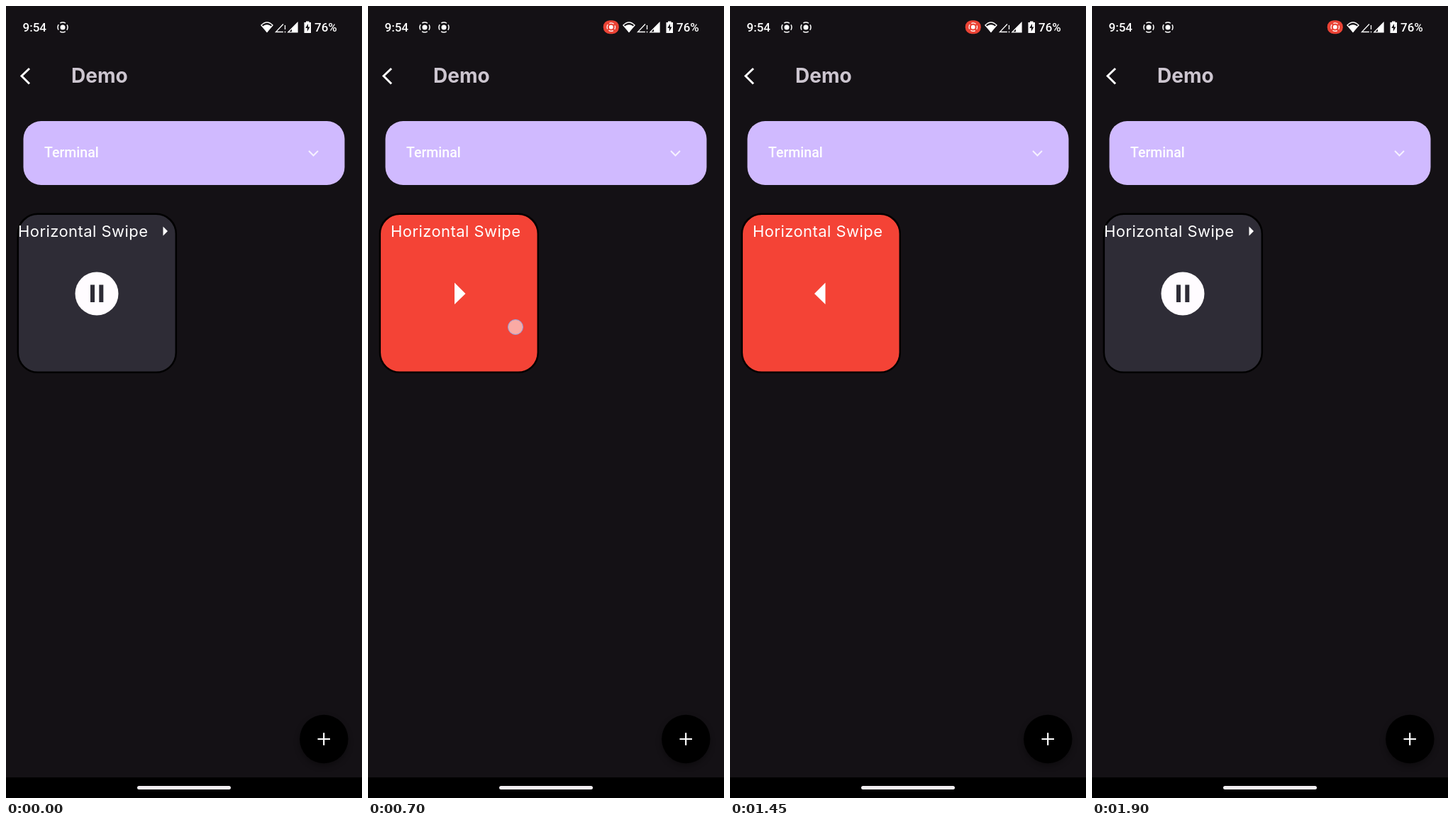
Recreate the animation shown at these times as an HTML page. Size 502 by 1115 pixels, loop 2.25 s.

```html
<!DOCTYPE html>
<html lang="en">
<head>
<meta charset="utf-8">
<title>Swipe demo</title>
<style>
  html, body { margin: 0; width: 100%; height: 100%; overflow: hidden; background: #141115; }
  svg { display: block; width: 502px; height: 1115px; }
  text { fill: #fff; }
  .roboto { font-family: Roboto, sans-serif; font-weight: 500; }
  .inter { font-family: Inter, sans-serif; }
  .line { fill: none; stroke: #fff; }
</style>
</head>
<body>
<svg viewBox="0 0 502 1115">
  <defs>
    <g id="record">
      <circle r="3.5" fill="#fff"/>
      <circle class="line" r="7" stroke-width="1.5" stroke-dasharray="8 3" stroke-dashoffset="4"/>
    </g>
    <filter id="soft" x="-30%" y="-30%" width="160%" height="160%"><feGaussianBlur stdDeviation="4"/></filter>
  </defs>
  <rect width="502" height="1115" fill="#141115"/>

  <!-- status bar -->
  <g class="roboto" font-size="17">
    <text x="23.5" y="36">9:54</text>
    <text x="435" y="36">76%</text>
  </g>
  <use id="newIcon" href="#record" x="80" y="30"/>
  <use id="oldIcon" href="#record" y="30"/>
  <g id="chip">
    <rect x="-11" y="-9.5" width="22" height="19" rx="9" fill="#ea4335"/>
    <use href="#record" transform="scale(.82)"/>
  </g>
  <g fill="#fff">
    <path class="line" d="M360 27Q368 19 376 27L368 36.500Z" stroke-width="1.4"/>
    <path d="M362 28.500Q368 24 374 28.500L368 37Z"/>
    <path class="line" d="M391 25.500L380.500 36.500H391M393.500 27V33M393.500 35.500V37.500" stroke-width="1.3"/>
    <path class="line" d="M398 36.800L411 23.500V36.800Z" stroke-width="1.3"/>
    <path d="M403 31.500L411 23.500V37H403Z"/>
    <path d="M423 21.500H427.500V23H430V38H420.500V23H423Z"/>
  </g>
  <path d="M426 25L422.300 31H424.800V36L428.500 29.500H426Z" fill="#141115"/>

  <!-- header -->
  <path class="line" d="M33 88L22 98.500L33 109.500" stroke-width="3"/>
  <text class="inter" x="92" y="108" font-size="28" font-weight="700" style="fill:#cdc6d0">Demo</text>

  <rect x="24.500" y="162" width="453" height="90" rx="25" fill="#d0baff"/>
  <text class="roboto" x="54" y="213" font-size="19.5">Terminal</text>
  <path class="line" d="M427 204L433.500 210.500L440 204" stroke-width="2" opacity=".8"/>

  <!-- card -->
  <rect id="card" x="16.800" y="292.800" width="223" height="223" rx="28" stroke="#000" stroke-width="2.500"/>
  <text id="title" class="inter" y="324.500" font-size="22" letter-spacing=".45">Horizontal Swipe</text>
  <g id="paused">
    <path d="M221.500 310.500L228 317L221.500 323.500Z" fill="#fff"/>
    <circle cx="128" cy="405" r="30.500" fill="#fffcff"/>
    <path d="M119 392.500h6v24.500h-6zM131.300 392.500h6v24.500h-6z" fill="#2e2c36"/>
  </g>
  <path id="arrow" fill="#fff"/>
  <circle id="touch" r="10.500" fill="#fff" fill-opacity=".55" stroke="#8fa4e0"/>

  <!-- bottom -->
  <circle cx="448" cy="1036" r="34" fill="#000" opacity=".35" filter="url(#soft)"/>
  <circle cx="448.300" cy="1032" r="34.200" fill="#000"/>
  <path class="line" d="M439.500 1032h17.500M448.200 1023.300v17.500" stroke-width="2.200"/>
  <rect y="1086" width="502" height="29" fill="#000"/>
  <rect x="185" y="1098" width="132" height="5" rx="2.500" fill="#f2eef2"/>
</svg>
<script>
  const LOOP = 2250, STEP = 50, SWIPE = 150;
  const swipes = [
    { at: 650, from: 150, to: 232.4, y: 452 },
    { at: 1150, from: 184, to: 90, y: 460 },
    { at: 1650, from: 165, to: 77, y: 452 }
  ];
  const RIGHT = "M122 389.500L137.500 405L122 420Z";
  const LEFT = "M134.500 389.500L119 405L134.500 420Z";

  const $ = id => document.getElementById(id);
  const set = (id, attrs) => {
    for (const key in attrs) $(id).setAttribute(key, attrs[key]);
  };
  const ramp = (t, a, b) => Math.min(1, Math.max(0, (t - a) / (b - a)));
  const easeOut = (u, power) => 1 - (1 - u) ** power;

  function draw(t) {
    // the second notification pushes the first one aside
    set("newIcon", { opacity: ramp(t, 300, 500) });
    set("oldIcon", { x: 80 + 27 * easeOut(ramp(t, 200, 500), 2) });
    const grow = ramp(t, 50, 300);
    set("chip", {
      opacity: t < 100 ? 0 : grow,
      transform: `translate(342.800 29.700) scale(${0.6 + 0.4 * grow})`
    });

    const active = t >= 700 && t < 1700;
    set("card", { fill: active ? "#f44336" : "#2e2c36" });
    set("title", { x: active ? 32 : 17 });
    set("paused", { visibility: active ? "hidden" : "visible" });
    set("arrow", {
      visibility: active ? "visible" : "hidden",
      d: t < 1200 ? RIGHT : LEFT
    });

    const swipe = swipes.find(s => t >= s.at && t <= s.at + SWIPE);
    set("touch", { visibility: swipe ? "visible" : "hidden" });
    if (swipe) {
      const u = easeOut((t - swipe.at) / SWIPE, 3);
      set("touch", { cx: swipe.from + (swipe.to - swipe.from) * u, cy: swipe.y });
    }
  }

  const start = performance.now();
  function tick() {
    const t = (performance.now() - start) % LOOP;
    draw(Math.floor(t / STEP) * STEP);
    requestAnimationFrame(tick);
  }
  tick();
</script>
</body>
</html>
```
